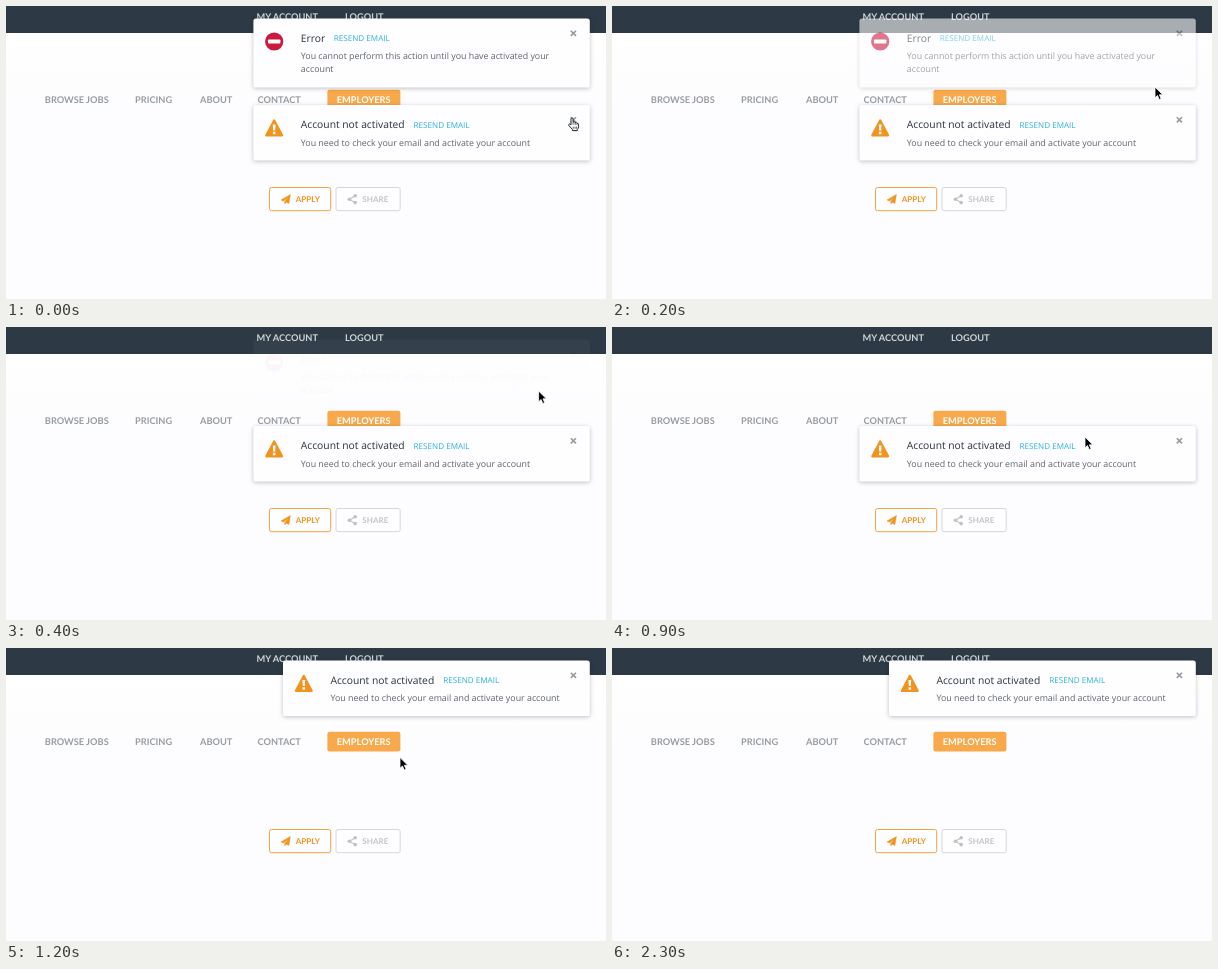
Write an HTML page that moves like this. It is 600 px wide and 293 px high and loops after 3.1 s.

```html
<!DOCTYPE html>
<html lang="en">
<head>
<meta charset="utf-8">
<title>Account notifications</title>
<style>
  html, body { margin: 0; width: 100%; height: 100%; overflow: hidden; background: #fdfcfe; }
  svg { display: block; width: 600px; height: 293px; text-rendering: geometricPrecision; }
  .nav { font: 700 9.25px Lato, sans-serif; fill: #969ca1; }
  .top { fill: #d0d5d9; }
  .strong { fill: #fff; }
  .btn { font: 700 8px Lato, sans-serif; }
  .title { font: 10.3px "Open Sans", sans-serif; fill: #27323a; }
  .body { font: 8.86px "Open Sans", sans-serif; fill: #5d656b; }
  .link { font: 8.1px "Open Sans", sans-serif; fill: #2cb0dc; }
  .card { filter: drop-shadow(0 1px 2px rgba(0, 0, 0, .25)); }
  .close { stroke: #959a9f; stroke-width: 1.6; }
</style>
</head>
<body>
<svg viewBox="0 0 600 293">
  <defs>
    <linearGradient id="page" x2="0" y2="1">
      <stop stop-color="#fff"/>
      <stop offset="1" stop-color="#fdfcfe"/>
    </linearGradient>
    <path id="cross" class="close" d="M-2.6-2.6 2.6 2.6M2.6-2.6-2.6 2.6"/>
  </defs>

  <rect width="600" height="293" fill="#fdfcfe"/>
  <rect y="27" width="600" height="80" fill="url(#page)"/>
  <rect width="600" height="27" fill="#2d3a45"/>
  <g class="nav">
    <text class="top" x="250.5" y="14.1">MY ACCOUNT</text>
    <text class="top" x="339" y="14.1">LOGOUT</text>
    <text x="38.8" y="97.1">BROWSE JOBS</text>
    <text x="129" y="97.1">PRICING</text>
    <text x="194" y="97.1">ABOUT</text>
    <text x="251.5" y="97.1">CONTACT</text>
    <rect x="321.4" y="83.7" width="73" height="19.7" rx="2.2" fill="#f8a94b"/>
    <text class="strong" x="330.8" y="97.1">EMPLOYERS</text>
  </g>

  <g class="btn">
    <rect x="263.5" y="181.5" width="61.2" height="23.2" rx="2" fill="#fefdff" stroke="#f2a640"/>
    <path d="M284.4 188.6 275 193.9l2.6 1.2 4.8-4.2-3.6 4.7v2.2l1.5-1.6 2.6 1.2Z" fill="#ef941d" stroke="#ef941d" stroke-width=".5"/>
    <text x="289.8" y="196.1" fill="#ef941d">APPLY</text>
    <rect x="330" y="181.5" width="64.2" height="23.2" rx="2" fill="#fefdff" stroke="#d5d8db"/>
    <path d="M349.2 189.8 343.4 193.2 349.2 196.6" fill="none" stroke="#bcc2c6" stroke-width="1.1"/>
    <g fill="#bcc2c6">
      <circle cx="343.4" cy="193.2" r="1.8"/>
      <circle cx="349.2" cy="189.8" r="1.8"/>
      <circle cx="349.2" cy="196.6" r="1.8"/>
    </g>
    <text x="356.2" y="196.1" letter-spacing=".1" fill="#c0c5c8">SHARE</text>
  </g>

  <g id="error" class="card" transform="translate(247.4 12.5)">
    <rect width="336.4" height="69" rx="2.6" fill="#fefdff"/>
    <circle cx="20.8" cy="23" r="9.1" fill="#cb1a3d"/>
    <rect x="14.6" y="21" width="12.4" height="4" rx=".8" fill="#fff"/>
    <text class="title" x="47.4" y="23.3">Error</text>
    <text class="link" x="80.4" y="22.9">RESEND EMAIL</text>
    <text class="body" x="47.4" y="40.6">You cannot perform this action until you have activated your</text>
    <text class="body" x="47.4" y="53.8">account</text>
    <use href="#cross" x="320" y="14.8"/>
  </g>

  <g id="warning" class="card">
    <rect id="panel" height="55.6" rx="2.6" fill="#fefdff"/>
    <path d="M20.8 15.6 28.6 30.2H13Z" fill="#f0941f" stroke="#f0941f" stroke-width="2.4" stroke-linejoin="round"/>
    <path d="M19.4 19.4h2.8l-.4 6h-2ZM19.5 26.8h2.6v2.4h-2.6Z" fill="#fff"/>
    <text class="title" x="47.4" y="23.3">Account not activated</text>
    <text class="link" x="160.2" y="22.9">RESEND EMAIL</text>
    <text class="body" x="47.4" y="40.6">You need to check your email and activate your account</text>
    <use id="dismiss" href="#cross" y="14.8"/>
  </g>

  <path id="arrow" d="M0 0V10.8L2.5 8.5 4.2 12.5 6.1 11.7 4.4 7.8H7.8Z" stroke="#fff" stroke-width=".8"/>
  <g id="hand" transform="translate(562 111.4)" fill="#fff" stroke="#1c2228" stroke-linejoin="round">
    <path d="M3 7V1.5Q3.2.4 4.1.4 5 .5 5.1 1.5V4.6Q6.8 4.1 7.2 5.1 8.7 4.7 9 5.9 10.5 5.6 10.6 7.2V9.4Q10.3 11.2 9.4 12V13.2H4.4V12L.9 8.2Q.3 7 1.4 6.6 2.3 6.5 3 7.6Z"/>
    <path d="M5.1 4.6V7.4M7.2 5.1V7.6M9 5.9V7.8M5.2 9.2V11.4M7 9.2V11.4M8.6 9.2V11.4" stroke-width=".7"/>
  </g>
</svg>
<script>
  const LOOP = 3100, TICK = 100;
  const FADE = 450, COLLAPSE = 1100, LEAVE = 2300;
  const RIGHT = 583.8;

  // Turning points of the pointer: ms, x, y.
  const route = [
    [0, 567, 112], [200, 543, 81], [400, 532.6, 64], [600, 510, 184],
    [900, 473, 110], [1200, 394, 109.5], [1400, 459, 98], [1600, 414, 61.5],
    [1700, 414, 61.5], [2000, 394, 71], [2100, 394, 71], [2200, 440, 80]
  ];

  const $ = id => document.getElementById(id);
  const move = (id, x, y) => $(id).setAttribute('transform', `translate(${x} ${y})`);
  const show = (id, opacity) => { $(id).style.opacity = opacity; };

  function pointerAt(t) {
    const next = route.findIndex(p => p[0] > t);
    if (next < 0) return route[route.length - 1].slice(1);
    const [t0, x0, y0] = route[next - 1], [t1, x1, y1] = route[next];
    const k = (t - t0) / (t1 - t0);
    return [x0 + (x1 - x0) * k, y0 + (y1 - y0) * k];
  }

  function draw(t) {
    show('hand', t < TICK ? 1 : 0);
    show('arrow', t >= TICK && t < LEAVE ? 1 : 0);
    move('arrow', ...pointerAt(t));

    show('error', (1 + Math.cos(Math.PI * Math.min(t / FADE, 1))) / 2);

    const collapsed = t >= COLLAPSE;
    const width = collapsed ? 306.8 : 336.4;
    move('warning', RIGHT - width, collapsed ? 12.5 : 99);
    $('panel').setAttribute('width', width);
    $('dismiss').setAttribute('x', width - 16.4);
  }

  const start = performance.now();
  function frame() {
    const t = (performance.now() - start) % LOOP;
    draw(Math.floor(t / TICK) * TICK);
    requestAnimationFrame(frame);
  }
  frame();
</script>
</body>
</html>
```
